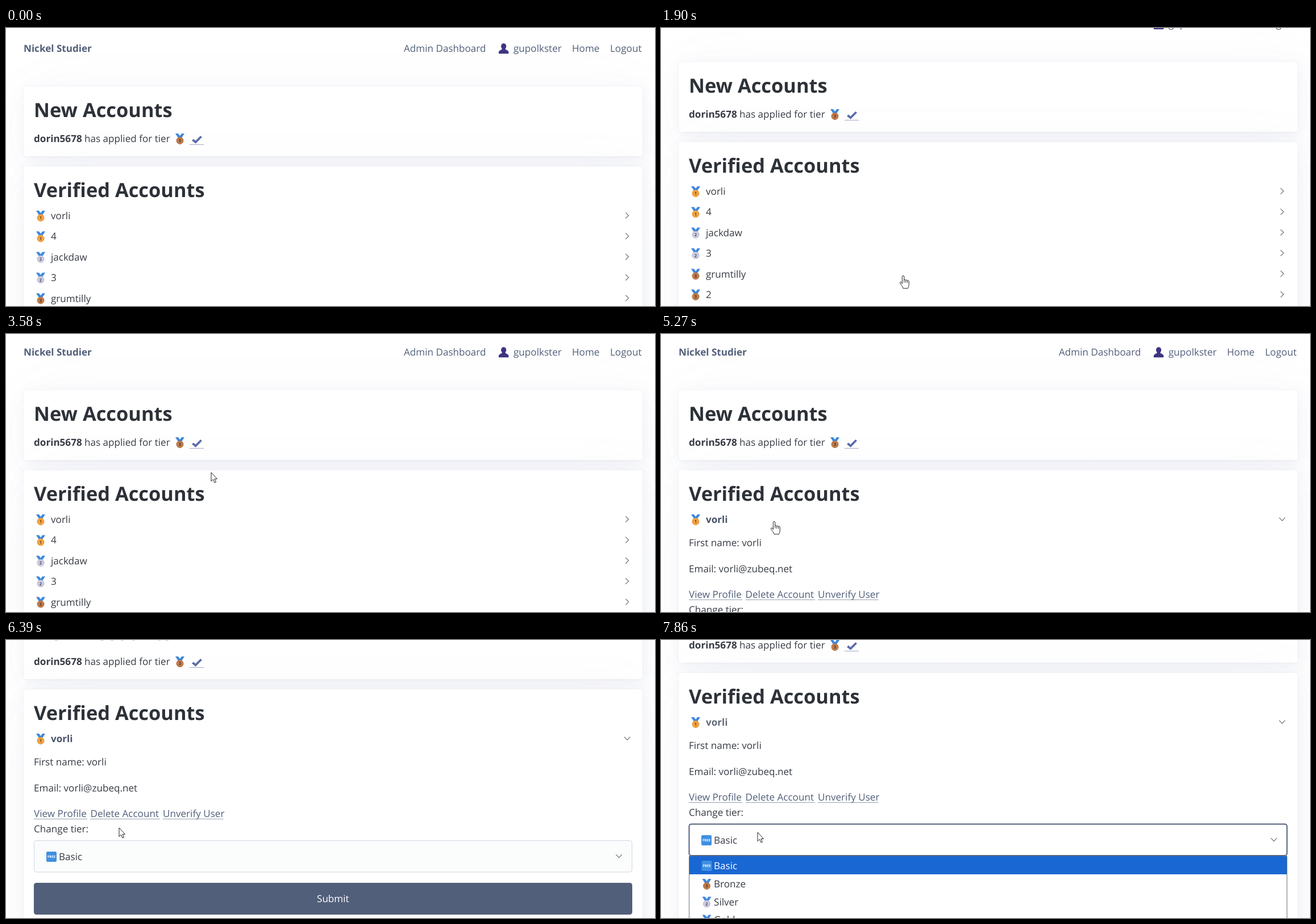
An HTML page for the animation above (8 s loop, 1142 px wide and 490 px high).

```html
<!DOCTYPE html>
<html lang="en">
<head>
<meta charset="utf-8">
<title>Admin dashboard</title>
<style>
  html { font-size: 18.2px; }
  html, body { margin: 0; width: 100%; height: 100%; overflow: hidden; background: #fff; }
  #stage { position: relative; width: 1142px; height: 490px; overflow: hidden; }
  #page, #stage svg { position: absolute; left: 0; top: 0; }
  .card { position: absolute; left: 31px; width: 1089px; background: #fff; border-radius: 4.5px; }
  text { font: 17.1px "Open Sans", "Noto Sans", sans-serif; fill: #373c44; white-space: pre; text-rendering: geometricPrecision; }
  text.b { font-weight: 700; }
  text.h { font-size: 34.4px; font-weight: 700; fill: #2d3138; }
  text.link { fill: #525f7a; }
  text.white { fill: #fff; }
  text.num { font-size: 7.5px; font-weight: 700; text-anchor: middle; }
  text.free { font-size: 6px; font-weight: 700; fill: #fff; text-anchor: middle; }
  .chev { fill: none; stroke: #646b79; stroke-width: 1.15; }
  .line { stroke: #525f7a; stroke-opacity: .6; }
  .mouse path { fill: #fff; stroke: #222; stroke-linejoin: round; }
</style>
</head>
<body>
<div id="stage">
  <div id="page">
    <div class="card" style="top:103px;height:123px"></div>
    <div class="card" style="top:244px;height:700px"></div>
    <svg id="content" width="1142" height="720"></svg>
  </div>
  <svg width="1142" height="490">
    <g id="mouse" class="mouse">
      <path id="arrow" d="M0 0V15.5L3.6 12.2L6 18L8.5 17L6.1 11.4H10.5Z"/>
      <g id="hand">
        <path d="M-1.6 13.5V1.2a1.7 1.7 0 0 1 3.4 0V7.5c0-1.5 3-1.3 3 .5c.3-1.4 2.8-1.2 2.9.6c.4-1.2 2.6-.8 2.6 1V15c0 4-1.5 5-2 7H.3C-.5 19-3 16.5-5.3 12.8c-.9-1.6 1-2.7 2.2-1.5z"/>
        <path d="M1.8 7.5v4M4.8 8v4M7.7 8.6v3.4"/>
      </g>
    </g>
  </svg>
</div>
<script>
const $ = id => document.getElementById(id);
const LOOP = 8000, OPEN = 4790, FOCUS = 7590, LIST = 7660;

// Soft layered card shadow: offset in rem and opacity
const layers = [[.0145, .017], [.0335, .024], [.0625, .03], [.1125, .036], [.2085, .043], [.5, .06]];
const shadow = layers.map(([r, a]) => `${r}rem ${2 * r}rem ${12 * r}rem rgb(129 145 181 / ${a})`)
  .concat('0 0 0 .0625rem rgb(129 145 181 / .015)').join();
document.querySelectorAll('.card').forEach(c => c.style.boxShadow = shadow);

const text = (x, y, s, cls = '', id = '') => `<text x="${x}" y="${y}" class="${cls}" id="${id}">${s}</text>`;

const metals = { 1: ['#f2a341', '#e0953a', '#6b431c'], 2: ['#cdcde0', '#b6b6d0', '#4a4a68'], 3: ['#c17d4b', '#ac6b40', '#5a3218'] };
function medal(x, y, n) {
  const [face, rim, ink] = metals[n];
  return `<g transform="translate(${x} ${y})">
    <path d="M-8-9h5l3 4 3-4h5l-4.5 7h-7z" fill="#3f88dc"/>
    <circle cy="3.5" r="6" fill="${face}" stroke="${rim}"/>
    <text y="6.3" class="num" style="fill:${ink}">${n}</text></g>`;
}

const free = (x, y) => `<g transform="translate(${x} ${y})">
  <rect x="-9" y="-9" width="18" height="18" rx="2" fill="#3f8fe2"/>${text(0, 2.2, 'FREE', 'free')}</g>`;

const place = (x, y, angle) => `translate(${x} ${y}) rotate(${angle})`;
const chevron = (x, y, angle, id = '') =>
  `<path class="chev" id="${id}" d="M-2.8-5.2L2.6 0L-2.8 5.2" transform="${place(x, y, angle)}"/>`;

const link = (x, end, s) => text(x, 469, s, 'link') + `<path class="line" d="M${x} 472.5H${end}"/>`;

const row = (name, n, i) => medal(61, 331 + 36.4 * i, n) +
  text(79, 337 + 36.4 * i, name) + chevron(1093, 330.5 + 36.4 * i, 0);

const option = (name, icon, i) => icon + text(93, 590 + 31.8 * i, name, i ? '' : 'white');

const users = [['4', 1], ['jackdaw', 2], ['3', 2], ['grumtilly', 3], ['2', 3]];

$('content').innerHTML =
  text(31, 42, 'Nickel Studier', 'b link') +
  text(700, 42, 'Admin Dashboard', 'link') +
  `<g fill="#3d3580"><ellipse cx="875.7" cy="32.3" rx="4.6" ry="5.4"/>
    <path d="M867 45.3v-2.5q0-3 5-4.5l1-2h5.4l1 2q5 1.5 5 4.5v2.5z"/></g>` +
  text(893, 42, 'gupolkster', 'link') +
  text(996, 42, 'Home', 'link') +
  text(1063, 42, 'Logout', 'link') +
  text(49, 157, 'New Accounts', 'h') +
  text(49, 201, 'dorin5678', 'b') +
  text(138, 201, 'has applied for tier') +
  medal(306, 195, 3) +
  `<path d="M327 198.3l3-2.8 3.4 3.2 8.8-8.7 2.8 2.3-11.3 11.4z" fill="#5b69ad"/>
   <path d="M323 205.5h25" stroke="#a3a9cd"/>` +
  text(49, 298, 'Verified Accounts', 'h') +
  medal(61, 331, 1) + text(79, 337, 'vorli', '', 'first') + chevron(1093, 330.5, 0, 'turn') +
  `<g id="rows">${users.map(([name, n], i) => row(name, n, i + 1)).join('')}</g>
  <g id="details">
    ${text(49, 378, 'First name: vorli')}
    ${text(49, 423.5, 'Email: vorli@zubeq.net')}
    ${link(49, 143, 'View Profile')}${link(148.5, 271, 'Delete Account')}${link(276, 382.5, 'Unverify User')}
    ${text(49, 496, 'Change tier:')}
    <rect id="select" x="49.5" y="510.5" width="1052" height="55.5" rx="4"/>
    ${free(80, 539)}${text(93, 545, 'Basic')}${chevron(1078.5, 538, 90)}
    <rect x="49" y="585" width="1053" height="56" rx="4.5" fill="#525f7a"/>
    ${text(547, 619, 'Submit', 'white')}
  </g>
  <g id="list">
    <rect x="49.5" y="567" width="1052" height="150" fill="#fff" stroke="#70747c"/>
    <rect x="50" y="567" width="1051" height="32" fill="#1967d2"/>
    ${option('Basic', free(80.5, 584), 0)}
    ${option('Bronze', medal(80.5, 616, 3), 1)}
    ${option('Silver', medal(80.5, 647.5, 2), 2)}
    ${option('Gold', medal(80.5, 679.5, 1), 3)}
  </g>`;

// Moves: start, end, steps, ease-out power, target x, target y
const scrolls = [
  [1350, 2110, 12, 2, 0, 46],
  [2240, 2450, 4, 1.2, 0, 0],
  [3110, 3110, 1, 1, 0, 4],
  [5530, 6390, 14, 1.35, 0, 157],
  [6790, 6990, 4, 1.3, 0, 186]
];
const moves = [
  [280, 410, 3, 1, 776, 455],
  [690, 950, 5, 1.5, 426, 437],
  [3310, 3580, 5, 1, 361, 244],
  [3650, 4110, 7, 1.5, 139, 315],
  [4180, 4180, 1, 1, 141, 320],
  [4380, 4580, 4, 1.3, 84, 323],
  [4860, 5000, 3, 1, 140, 313],
  [5060, 5270, 4, 1.3, 199, 331],
  [7260, 7530, 5, 1.3, 170, 339]
];
const handTimes = [[820, 3310], [4180, 4930], [5130, 6390]];

// The picture advances in held steps, each eased toward its target
function follow(list, t, x, y) {
  for (const [start, end, n, power, tx, ty] of list) {
    if (t < start) break;
    const gap = (end - start) / (n - 1) || 1;
    const p = Math.min(1, (Math.floor((t - start) / gap + .3) + 1) / n);
    const e = 1 - (1 - p) ** power;
    x += (tx - x) * e;
    y += (ty - y) * e;
  }
  return [Math.round(x), Math.round(y)];
}

const show = (id, on) => $(id).style.display = on ? '' : 'none';

function draw(now) {
  const t = now % LOOP, open = t >= OPEN, focus = t >= FOCUS;
  $('page').style.transform = `translateY(${-follow(scrolls, t, 0, 0)[1]}px)`;

  const hand = handTimes.some(([a, b]) => t >= a && t < b);
  $('mouse').setAttribute('transform', `translate(${follow(moves, t, 1154, 500)})`);
  show('mouse', t >= 280);
  show('hand', hand);
  show('arrow', !hand);

  show('rows', !open);
  show('details', open);
  show('list', t >= LIST);
  const turn = Math.max(0, Math.min(1, (t - OPEN) / 200));
  $('turn').setAttribute('transform', place(1093, 330.5, 90 * turn));
  $('first').style.fontWeight = open ? 700 : 400;
  $('first').style.fill = focus ? '#646b79' : open ? '#48536b' : '';

  const box = $('select').style;
  box.fill = focus ? '#fff' : '#fbfcfc';
  box.stroke = focus ? '#525f7a' : '#cfd5e2';
  box.strokeWidth = focus ? 2 : 1;
  requestAnimationFrame(draw);
}
requestAnimationFrame(draw);
</script>
</body>
</html>
```
